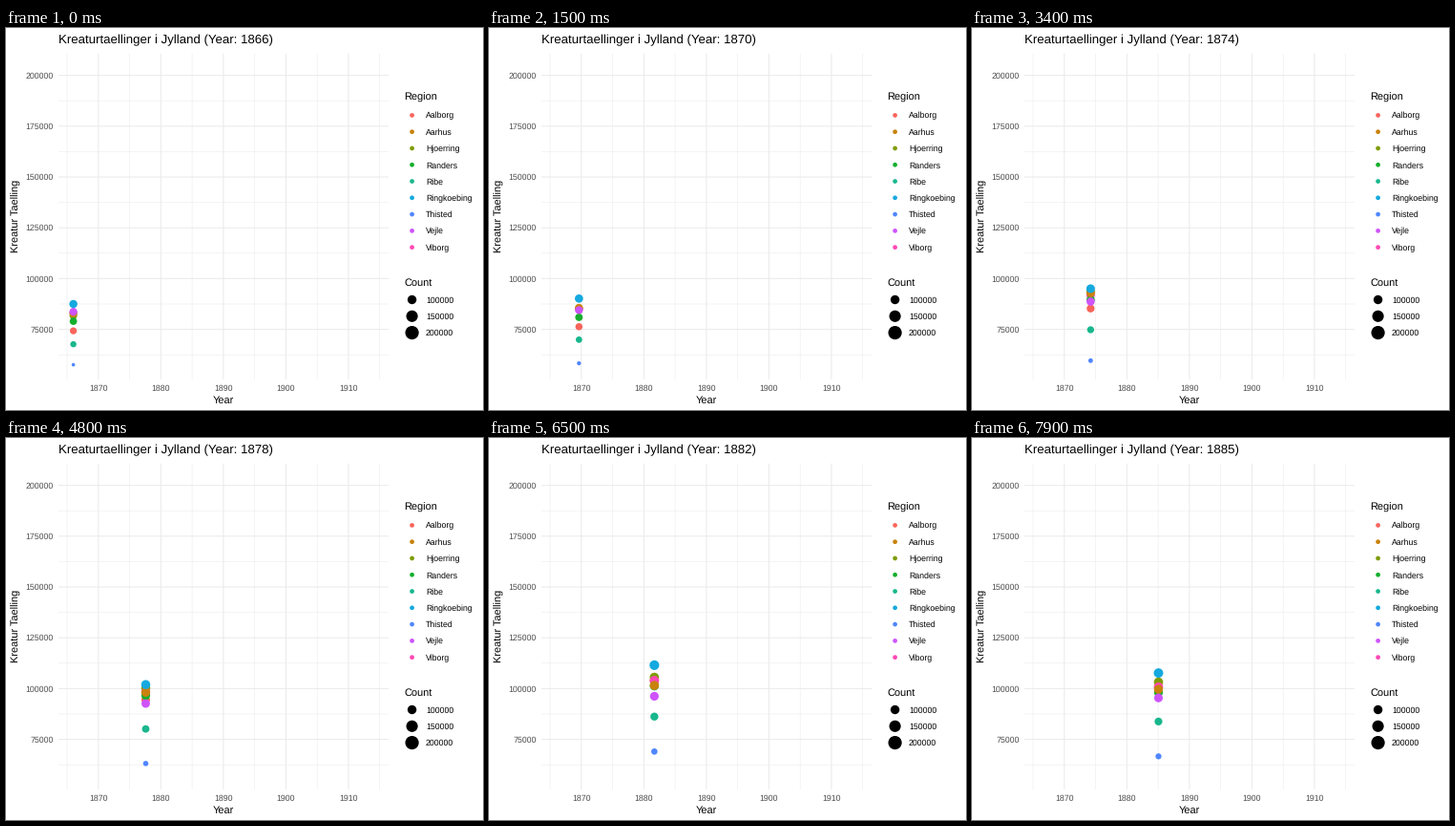
A matplotlib script that plays this animation: 500 by 400 pixels, repeating every 8 s.

```python
import numpy as np
import matplotlib.pyplot as plt
from matplotlib.animation import FuncAnimation

plt.rcParams["font.family"] = "Liberation Sans"
plt.rcParams["text.hinting"] = "none"
W, H, DPI = 500, 400, 100
PT = 72 / DPI  # points per pixel
FRAMES, INTERVAL = 80, 100
START, YEARS_PER_FRAME = 1866, 48 / 199
LEFT, RIGHT, TOP, BOTTOM = 55, 401, 26.7, 368
KEY_X, KEY_STEP, KEY_LABEL_X = 425.6, 17.28, 439.9

COLORS = {
    "Aalborg": "#F8645B", "Aarhus": "#C9820C", "Hjoerring": "#7F9C06",
    "Randers": "#16AE2D", "Ribe": "#18B78D", "Ringkoebing": "#15A9DF",
    "Thisted": "#5086FF", "Vejle": "#CE54FC", "Viborg": "#FE48B4",
}

# Thousands of cattle per census, in drawing order
CENSUS = [1866, 1871, 1876, 1881, 1888]
COUNTS = {
    "Hjoerring": [81.8, 86.5, 97.6, 106.0, 101.2],
    "Thisted": [57.6, 58.6, 60.2, 69.5, 64.6],
    "Aalborg": [74.3, 77.1, 89.9, 104.4, 98.3],
    "Viborg": [83.2, 85.6, 95.4, 104.6, 97.8],
    "Randers": [79.0, 81.7, 94.1, 102.0, 95.2],
    "Aarhus": [82.8, 86.7, 96.4, 101.9, 98.0],
    "Vejle": [83.7, 84.8, 90.9, 96.4, 94.7],
    "Ringkoebing": [87.5, 91.2, 97.2, 112.3, 104.3],
    "Ribe": [67.7, 70.8, 77.1, 86.7, 81.7],
}
LOW, HIGH = 57.6, 203.3


def px(year):
    return 70.6 + 6.553 * (year - 1866)


def py(count):
    return 262.4 - (count - 100) * 53.2 / 25


def radius(size):
    return 0.375 * (size * 2.845 + 0.94) + 0.4


def point_size(count):
    share = np.clip((np.asarray(count) - LOW) / (HIGH - LOW), 0, 1)
    return 1 + 5 * np.sqrt(share)


fig = plt.figure(figsize=(W / DPI, H / DPI), dpi=DPI, facecolor="white")
ax = fig.add_axes([0, 0, 1, 1])
ax.set_xlim(0, W)
ax.set_ylim(H, 0)
ax.axis("off")


def label(x, y, text, size=8.8, color="black", **kw):
    return ax.text(x, y, text, fontsize=size * PT, color=color,
                   va="baseline", **kw)


def grid(xs, ys, width):
    style = dict(color="#EBEBEB", lw=width * PT, snap=False,
                 solid_capstyle="butt", zorder=1)
    for x in xs:
        ax.plot([x, x], [TOP, BOTTOM], **style)
    for y in ys:
        ax.plot([LEFT, RIGHT], [y, y], **style)


def dot(x, y, r, color):
    return ax.add_patch(plt.Circle((x, y), r, fc=color, lw=0,
                                   snap=False, zorder=3))


def key(y, size, color, text):
    dot(KEY_X, y, radius(size), color)
    label(KEY_LABEL_X, y + 3.2, text)


years = np.arange(1870, 1911, 10)
counts = np.arange(75, 201, 25)
grid(px(np.arange(1865, 1916, 10)), py(np.arange(62.5, 188, 25)), 0.53)
grid(px(years), py(counts), 1.07)

for year in years:
    label(px(year), 380.2, str(year), color="#4D4D4D", ha="center")
for count in counts:
    label(50, py(count) + 3.2, f"{count}000", color="#4D4D4D", ha="right")
label(228, 392.8, "Year", 11, ha="center")
label(13.8, 197.2, "Kreatur Taelling", 11, ha="center", rotation=90,
      rotation_mode="anchor")

label(417, 76, "Region", 11)
for i, (name, color) in enumerate(COLORS.items()):
    key(91.4 + KEY_STEP * i, 1.5, color, name)

label(417, 270, "Count", 11)
for i, count in enumerate((100, 150, 200)):
    key(284.5 + KEY_STEP * i, point_size(count), "black", f"{count}000")

title = label(LEFT, 16.3, "", 13.2)
points = {name: dot(0, 0, 1, COLORS[name]) for name in COUNTS}


def update(frame):
    year = START + frame * YEARS_PER_FRAME
    for name, series in COUNTS.items():
        count = np.interp(year, CENSUS, series)
        size = np.interp(year, CENSUS, point_size(series))
        points[name].center = px(year), py(count)
        points[name].set_radius(radius(size))
    title.set_text(f"Kreaturtaellinger i Jylland (Year: {round(year)})")
    return [*points.values(), title]


anim = FuncAnimation(fig, update, frames=FRAMES, interval=INTERVAL,
                     repeat=True, repeat_delay=0)
plt.show()
```
